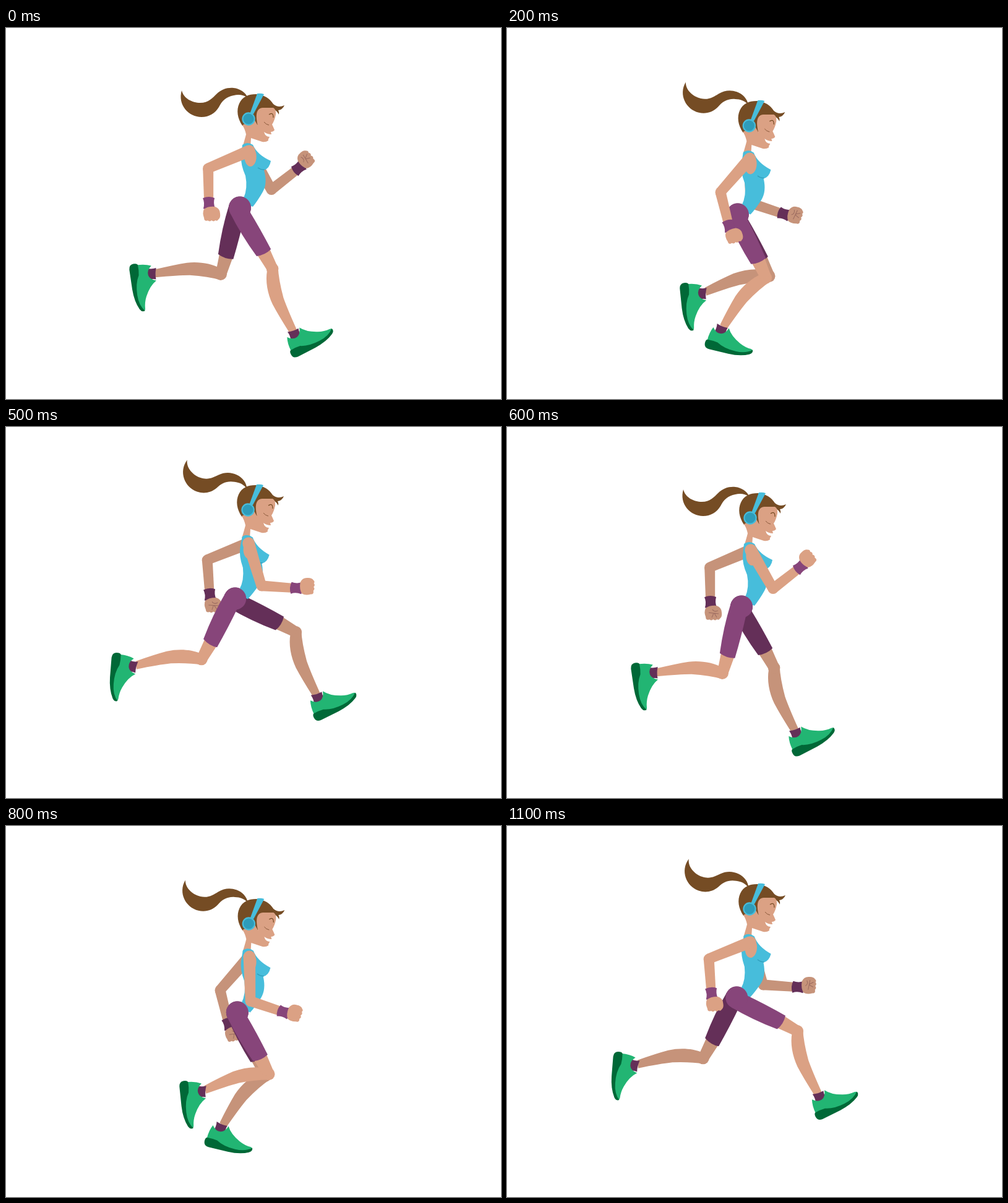
Animation of 800 by 600 pixels, one loop 1200 ms. Source, as an HTML page with a canvas:

```html
<!DOCTYPE html>
<html lang="en">
<head>
<meta charset="utf-8">
<title>Runner</title>
<style>
html, body { margin: 0; width: 100%; height: 100%; overflow: hidden; background: #fff; }
canvas { display: block; }
</style>
</head>
<body>
<canvas id="stage" width="800" height="600"></canvas>
<script>
const ctx = document.getElementById('stage').getContext('2d');
const STEP = 100, STRIDE = 12, HALF = STRIDE / 2;
const THIGH = 112, SHIN = 114, UPPER = 72, FORE = 56;

const BLUE = '#47bddb', TEAL = '#2e9cba', HAIR = '#754c24', PLUM = '#642f58';
const NEAR = { skin: '#dba184', cloth: '#87457a' };
const FAR = { skin: '#c6937a', cloth: PLUM };

// Key poses of one side in degrees, limbs measured forward from straight down.
const POSES = [
  { t: 0, thigh: 28, shin: 18, foot: -31, upper: -67, fore: 1 },
  { t: 1, thigh: 51, shin: -19, foot: 0, upper: -78, fore: -31 },
  { t: 2, thigh: 24, shin: -41, foot: 10, upper: -41, fore: 14 },
  { t: 3, thigh: -8, shin: -46, foot: 47, upper: -4, fore: 58 },
  { t: 5, thigh: -29, shin: -85, foot: 91, upper: 17, fore: 86 },
  { t: 6, thigh: -16, shin: -91, foot: 78, upper: 30, fore: 128 },
  { t: 7, thigh: -8, shin: -117, foot: 120, upper: 22, fore: 98 },
  { t: 9, thigh: 62, shin: -36, foot: 41, upper: -19, fore: 45 },
  { t: 11, thigh: 61, shin: 18, foot: -30, upper: -68, fore: 4 }
];
const BOUNCE = [{ t: 0, y: 147 }, { t: 1, y: 181 }, { t: 3, y: 135 }, { t: 5, y: 134 }];

const rad = deg => deg * Math.PI / 180;

// Blends the two keys around t in a loop of the given period.
function sample(keys, t, period) {
  const i = keys.findLastIndex(key => key.t <= t);
  const a = keys[i], b = keys[i + 1] || { ...keys[0], t: period };
  const u = (t - a.t) / (b.t - a.t);
  return Object.fromEntries(Object.keys(a).map(k => [k, a[k] + (b[k] - a[k]) * u]));
}

function fill(color, path) {
  ctx.fillStyle = color;
  ctx.fill(new Path2D(path));
}

function line(color, width, path) {
  ctx.strokeStyle = color;
  ctx.lineWidth = width;
  ctx.stroke(new Path2D(path));
}

function oval(color, x, y, rx, ry = rx) {
  ctx.fillStyle = color;
  ctx.beginPath();
  ctx.ellipse(x, y, rx, ry, 0, 0, 7);
  ctx.fill();
}

function at(x, y, angle, draw) {
  ctx.save();
  ctx.translate(x, y);
  ctx.rotate(rad(angle));
  draw();
  ctx.restore();
}

const reach = (length, angle, x = 0, y = 0) =>
  [x + length * Math.sin(rad(angle)), y + length * Math.cos(rad(angle))];

function shoe() {
  fill(PLUM, 'M-6 -11 Q3 -7 12 -7 Q9 0 11 7 L-9 5 Q-5 -3 -6 -11Z');
  fill('#22b573', 'M-11 -4 Q-5 5 3 4 Q10 3 14 -7 Q20 5 36 14 Q45 19 55 20 Q59 21 58 24 L40 31 L-16 26 L-17 18 Q-16 5 -11 -4Z');
  fill('#006837', 'M-17 17 Q-8 17 0 19 Q12 27 31 28 Q48 29 58 21 Q60 26 54 29 Q40 35 20 34 L-12 32 Q-20 31 -20 24 Q-20 18 -17 17Z');
}

function leg({ thigh, shin, foot }, { skin, cloth }) {
  const knee = reach(THIGH, thigh);
  at(...knee, -shin, () =>
    fill(skin, 'M-9 0 C-17 15 -20 35 -17.5 55 Q-14 75 -6 106 L7 106 Q3 70 2.5 50 Q4 20 9.5 0Z'));
  oval(skin, ...knee, 9.8);
  at(...reach(SHIN, shin, ...knee), foot, shoe);
  at(0, 0, -thigh, () => {
    fill(skin, 'M-12 70 L-8.5 112 L9 112 L12 70Z');
    fill(cloth, 'M-18 0 Q-19 40 -13 82 Q0 87 12.7 83 Q13 45 11 12Z');
  });
  oval(cloth, 0, 0, 18);
}

function hand({ skin, cloth }) {
  fill(cloth, 'M-9.5 -8 Q0 -12 9.5 -8 Q7 0 10 8 Q0 11 -9 9 Q-6 0 -9.5 -8Z');
  fill(skin, 'M-8 10 Q-2 5 10 6 Q18 9 18 17 Q19 24 15 27 Q13 30 10 28 Q7 31 4 28 Q1 31 -2 28 Q-8 30 -8 24 Q-11 16 -8 10Z');
  if (skin === FAR.skin) {
    line('#9b6b60', 1, 'M-3 17 L13 19 M3 12 Q6 17 12 14 M5 18 L2 25 M6 18 L10 25');
  }
}

function arm({ upper, fore }, look) {
  const elbow = reach(UPPER, upper);
  oval(look.skin, 0, 0, 9.8);
  at(0, 0, -upper, () => fill(look.skin, 'M-9.8 0 L-8.5 72 L8 72 L9.8 0Z'));
  oval(look.skin, ...elbow, 8.6);
  at(...elbow, -fore, () => fill(look.skin, 'M-8.5 0 L-7.5 54 L7.5 54 L8.5 0Z'));
  at(...reach(FORE, fore, ...elbow), -fore, () => hand(look));
}

function torso() {
  fill(BLUE, 'M-11 -10 Q-3 -16 6 -10 Q13 6 35 16 Q33 28 24 31 Q30 52 22 66 Q14 80 6 90 L-12 84 L-9 76 Q-2 60 -6 40 Q-14 22 -13 8Z');
  line(TEAL, 1.2, 'M14 27 Q20 31 25 30');
}

// Drawn around the ear.
function head(tail) {
  at(-2, -35, tail, () =>
    fill(HAIR, 'M-106 -11 C-103 2 -89 9 -76 9 C-63 9 -56 1 -50 -5 C-42 -13 -32 -16 -22 -15 C-12 -14 -3 -8 1 1 C-6 -4 -14 -5 -22 -3 C-34 -1 -41 6 -46 16 C-52 26 -62 32 -74 32 C-95 32 -113 12 -106 -11Z'));
  fill(HAIR, 'M-10 11 C-18 -1 -20 -14 -15 -25 C-10 -36 0 -40 12 -40 C26 -39 34 -33 40 -24 Q48 -17 58 -22 Q55 -15 48 -14 Q50 -11 49 -7 Q46 -13 40 -16 L20 0 L14 11 L2 12Z');
  fill(NEAR.skin, 'M-10 10 L0 5 L10 2 L15 11 C11 -6 12 -17 23 -18 L40 -18 Q45 -15 44 -7 Q42 3 38 9 Q40 13 42 18 Q40 21 36 21 L37 25 Q30 25 25 21 Q27 29 34 29 L33 31 Q31 33 32 35 Q28 38 22 37 L4 31 L3 46 L-10 46 Q-6 33 -4 25 Q-6 16 -10 10Z');
  line(HAIR, 1.2, 'M33 -7 Q40 -12 40 -2');
  line('#8c5a3c', 1, 'M25 5 Q28 9 33 10');
  fill(BLUE, 'M2 -8 L14 -41 Q20 -42 25 -40 L8 -8Z');
  oval(BLUE, 0, 0, 10.7);
  oval(TEAL, 0, 0, 8.6);
}

function draw(t) {
  const beat = t % HALF;
  const turn = rad(beat * 360 / HALF);
  const lean = 1.5 * Math.min(beat, 3);
  const tail = 9 + 6 * Math.cos(turn) - 15 * Math.cos(2 * turn);
  const x = 392 - lean / 4.5 + Math.floor(t / HALF);
  const { y } = sample(BOUNCE, beat, HALF);
  const near = sample(POSES, t, STRIDE);
  const far = sample(POSES, (t + HALF) % STRIDE, STRIDE);
  const atHip = part => at(x - 14 - 1.5 * lean, y + 143.5, 0, part);
  const atShoulder = (angle, part) => at(x + 1, y + 52 + lean / 2.25, angle, part);

  ctx.clearRect(0, 0, 800, 600);
  atShoulder(0, () => arm(far, FAR));
  atHip(() => leg(far, FAR));
  at(x, y, 0, () => head(tail));
  atShoulder(lean, torso);
  atHip(() => leg(near, NEAR));
  atShoulder(lean, () => oval(NEAR.skin, 2, 9, 9.7, 16));
  atShoulder(0, () => arm(near, NEAR));
}

const start = performance.now();
function tick() {
  draw(Math.floor((performance.now() - start) / STEP) % STRIDE);
  requestAnimationFrame(tick);
}
tick();
</script>
</body>
</html>
```
